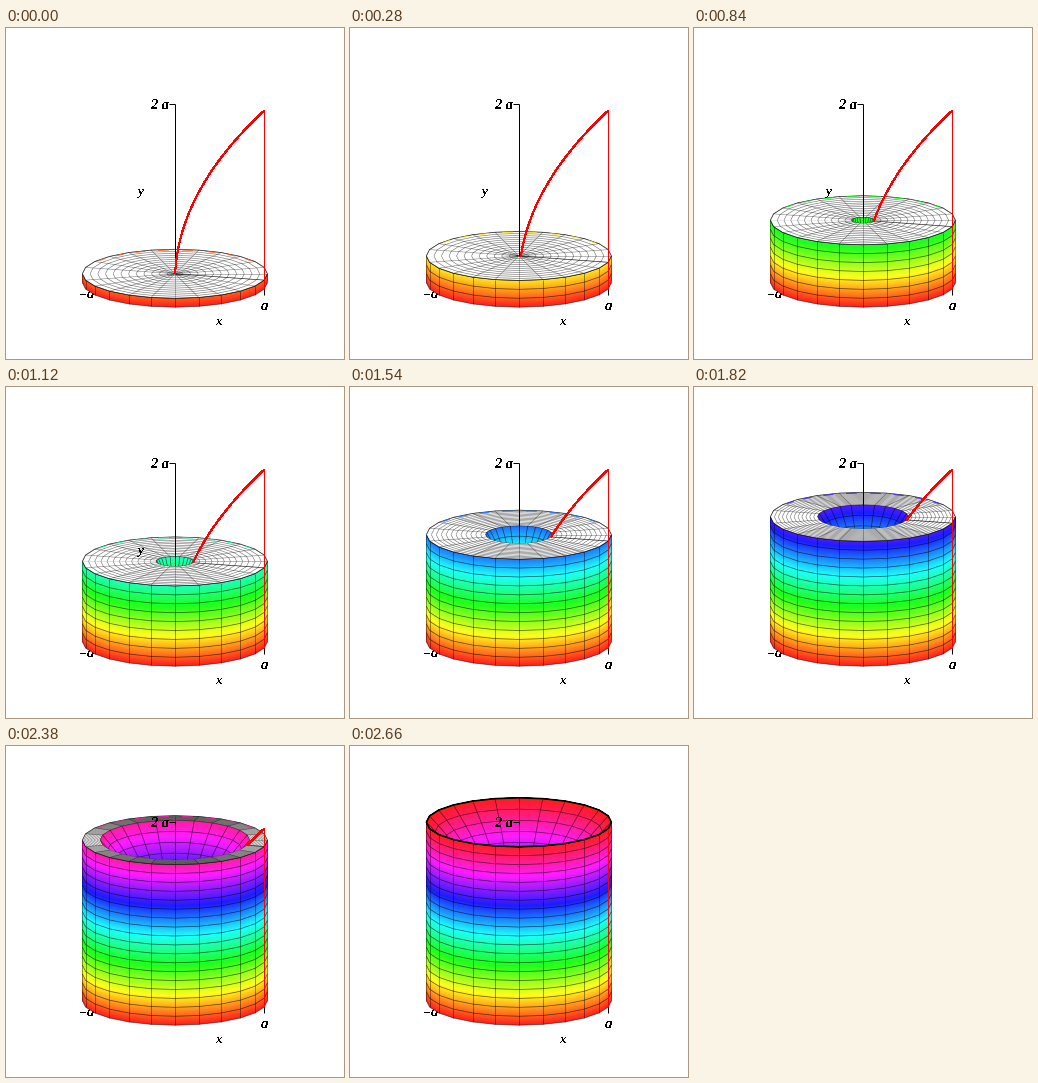
A matplotlib script for the animation above (2.8 s loop, 338 by 331 pixels).

```python
import colorsys

import numpy as np
import matplotlib.pyplot as plt
from matplotlib.animation import FuncAnimation
from matplotlib.collections import LineCollection, PolyCollection

W, H, DPI = 338, 331, 64
PX = 72 / DPI
STEPS, SIDES, RINGS = 20, 24, 12

CX, BASE = 168.9, 254.7      # foot of the axis
RX, RY, RISE = 92.5, 24.5, 178.4
TILT = np.radians(15)        # direction of the x axis

ANGLES = np.arange(SIDES + 1) * 2 * np.pi / SIDES
FRONT = ANGLES[:SIDES // 2 + 1]
BACK = ANGLES[SIDES // 2:]
BOWL = np.arange(-13, 2) * 2 * np.pi / SIDES   # visible part of the bowl

fig = plt.figure(figsize=(W / DPI, H / DPI), dpi=DPI, facecolor="white")
ax = fig.add_axes([0, 0, 1, 1])


def project(r, angle, z):
    """Screen points for cylindrical coordinates, r and z in 0..1."""
    x = CX + RX * r * np.cos(angle)
    y = BASE - RISE * z + RY * r * np.sin(angle)
    return np.column_stack(np.broadcast_arrays(x, y))


def hue(z):
    return colorsys.hsv_to_rgb(z % 1, 0.89, 1)


def fill(polys, colors):
    ax.add_collection(PolyCollection(polys, facecolors=colors, edgecolors="none",
                                     zorder=2), autolim=False)


def lines(paths, width=0.8, alpha=0.6, color="black", smooth=True):
    ax.add_collection(LineCollection(paths, colors=[color], alpha=alpha,
                                     linewidths=width * PX, antialiaseds=[smooth],
                                     zorder=2), autolim=False)


def label(x, y, text, size=15):
    ax.text(x, y, text, family="Liberation Serif", style="italic", weight="bold",
            size=size * PX, ha="left", va="baseline", antialiased=False, zorder=2)


def band(lower, upper):
    return np.vstack([lower, upper[::-1]])


def annulus(angles, inner, z):
    """White half of the top face with its mesh."""
    if inner < 1:
        fill([band(project(inner, angles, z), project(1, angles, z))], ["white"])
    radii = np.linspace(inner, 1, RINGS + 1)
    lines([project(r, angles, z) for r in radii], 0.6, 0.55)
    lines([project(np.array([inner, 1]), t, z) for t in angles[:-1]], 0.55, 0.5)
    lines([project(1, angles, z)], 0.8, 0.6)


def flecks(z):
    """Wall colour showing through along the far rim."""
    pts = project(1, BACK, z)
    pairs = list(zip(pts[:-1], pts[1:]))[2:-2]
    lines([[p + 0.3 * (q - p) + [0, 0.6], p + 0.75 * (q - p) + [0, 0.6]]
           for p, q in pairs], 1, 0.9, hue(z))


def bowl(z):
    levels = np.linspace(z, 0, int(z * RISE / 1.5) + 2)
    fill([project(v * v, ANGLES, v) for v in levels], [hue(v) for v in levels])
    marks = np.arange(1, round(z * STEPS) + 1) / STEPS
    lines([project(v * v, BOWL, v) for v in marks], 0.7, 0.6)
    fine = np.linspace(0, z, 40)
    lines([project(fine ** 2, t, fine) for t in BOWL], 0.7, 0.6)


def wall(z):
    levels = np.linspace(0, z, int(z * RISE) + 2)
    top = project(1, FRONT, z)
    fill([band(project(1, FRONT, v), top) for v in levels[:-1]],
         [hue((a + b) / 2) for a, b in zip(levels, levels[1:])])
    marks = np.arange(0, round(z * STEPS) + 1) / STEPS
    lines([project(1, FRONT, v) for v in marks], 0.75, 0.6)
    lines([project(1, t, np.array([0, z])) for t in FRONT], 0.8, 0.5)


def axis():
    top = BASE - RISE
    lines([[(CX, top), (CX, BASE)], [(CX - 6, top), (CX, top)]], 1, 1)
    label(145.5, 81, "2\u2009a")
    label(132, 167, "y", 13)
    label(73, 269, "\u2212", 12)
    label(80.5, 270, "a")


def draw(i):
    ax.clear()
    ax.set_xlim(0, W)
    ax.set_ylim(H, 0)
    ax.axis("off")

    z = (i + 1) / STEPS
    inner = z * z

    annulus(BACK, inner, z)
    flecks(z)
    bowl(z)
    axis()
    wall(z)
    annulus(FRONT, inner, z)
    if inner < 1:
        lines([project(np.array([inner, 1]), TILT, z)], 0.7, 0.6)
    else:
        lines([project(1, ANGLES, z)], 1.6, 1)

    # remaining part of the profile curve and its right edge
    v = np.linspace(z, 1, 60)
    lines([project(v * v, TILT, v)], 1.1, 1, "red", smooth=False)
    lines([project(1, TILT, np.array([0, 1]))], 1, 1, "red", smooth=False)

    end = project(1, TILT, 0)[0]
    lines([[end, end + [0, 5.5]]], 1, 1)
    label(254.5, 282.5, "a")
    label(210, 297, "x", 13)
    return []


anim = FuncAnimation(fig, draw, frames=STEPS, interval=140, init_func=lambda: [],
                     repeat=True, repeat_delay=0)
plt.show()
```
